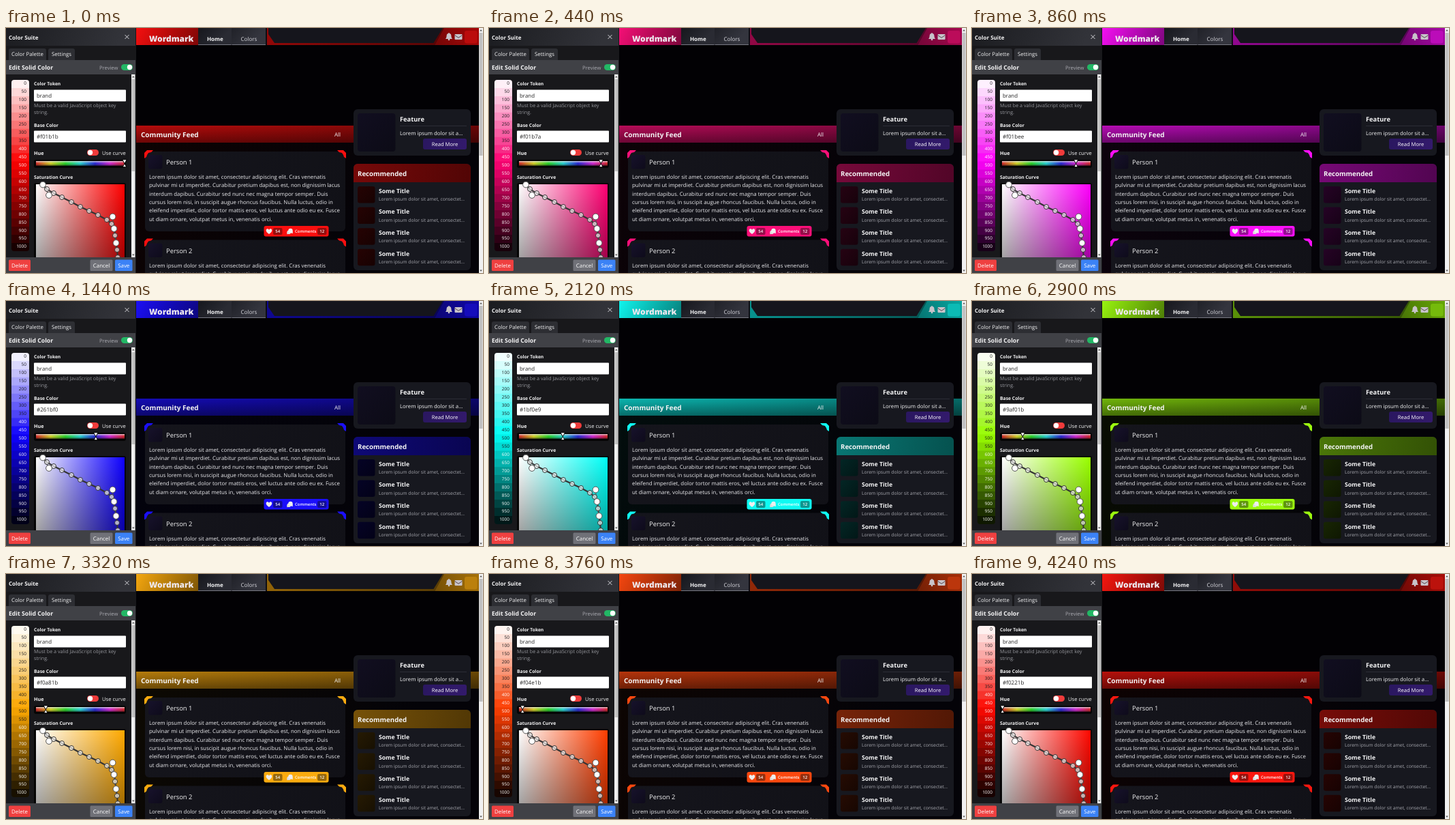
Recreate the animation shown at these times as an HTML page with a canvas. Size 700 by 359 pixels, loop 4260 ms.

```html
<!DOCTYPE html>
<html lang="en">
<head>
<meta charset="utf-8">
<title>Color Suite</title>
<style>
html, body { margin: 0; width: 100%; height: 100%; overflow: hidden; background: #050308; }
canvas { display: block; width: 700px; height: 359px; }
</style>
</head>
<body>
<canvas id="stage" width="700" height="359"></canvas>
<script>
const g = document.getElementById('stage').getContext('2d');
g.textRendering = 'geometricPrecision';
const LOOP = 4260, STEP = 20;
const FONT = '"Open Sans", "Noto Sans", sans-serif';
const LOREM = [
  'Lorem ipsum dolor sit amet, consectetur adipiscing elit. Cras venenatis',
  'pulvinar mi ut imperdiet. Curabitur pretium dapibus est, non dignissim lacus',
  'interdum dapibus. Curabitur sed nunc nec magna tempor semper. Duis',
  'cursus lorem nisi, in suscipit augue rhoncus faucibus. Nulla luctus, odio in',
  'eleifend imperdiet, dolor tortor mattis eros, vel luctus ante odio eu ex. Fusce',
  'ut diam ornare, volutpat metus in, venenatis orci.'
];

// Hue drag: [ms, degrees, degrees per ms]
const DRAG = [
  [0, 360, -.05], [860, 300.6, -.083], [1440, 243.1, -.097], [2120, 178.03, -.105],
  [2500, 134.37, -.116], [3320, 39.72, -.075], [4240, 1.97, -.012], [4260, 1.8, 0]
];

function hueAt(t) {
  let i = 0;
  while (i < DRAG.length - 2 && t > DRAG[i + 1][0]) i++;
  const [t0, a, m0] = DRAG[i], [t1, b, m1] = DRAG[i + 1];
  const d = t1 - t0, u = (t - t0) / d, v = 1 - u;
  return v * v * (1 + 2 * u) * a + u * v * v * d * m0 +
         u * u * (3 - 2 * u) * b - u * u * v * d * m1;
}

const hsl = (h, s, l, a = 1) => `hsla(${h},${s}%,${l}%,${a})`;

function channels(h) {
  return [0, 240, 120].map(o => {
    const d = Math.abs(((h + o) % 360) / 60 - 3) - 1;
    return Math.round(27 + 213 * Math.min(1, Math.max(0, d)));
  });
}

const hex = rgb => '#' + rgb.map(c => c.toString(16).padStart(2, '0')).join('');

function ramp(x0, y0, x1, y1, ...stops) {
  const r = g.createLinearGradient(x0, y0, x1, y1);
  stops.forEach((c, i) => r.addColorStop(i / (stops.length - 1), c));
  return r;
}

function box(x, y, w, h, fill, r = 0) {
  g.fillStyle = fill;
  g.beginPath();
  g.roundRect(x, y, w, h, r);
  g.fill();
}

function poly(fill, ...p) {
  g.fillStyle = fill;
  g.beginPath();
  for (let i = 0; i < p.length; i += 2) g.lineTo(p[i], p[i + 1]);
  g.closePath();
  g.fill();
}

function line(color, width, ...p) {
  g.strokeStyle = color;
  g.lineWidth = width;
  g.beginPath();
  for (let i = 0; i < p.length; i += 2) g.lineTo(p[i], p[i + 1]);
  g.stroke();
}

function dot(x, y, r, fill, edge) {
  g.beginPath();
  g.arc(x, y, r, 0, 7);
  g.fillStyle = fill;
  g.fill();
  if (edge) {
    g.strokeStyle = edge;
    g.lineWidth = 1;
    g.stroke();
  }
}

function text(s, x, y, size, color = '#f4f4f5', weight = 400, align = 'left') {
  g.font = `${weight} ${size}px ${FONT}`;
  g.textAlign = align;
  g.fillStyle = color;
  g.fillText(s, x, y);
}

const bold = (s, x, y, size, color) => text(s, x, y, size, color, 700);

function toggle(x, y, color, on) {
  box(x, y, 17, 9, color, 4.5);
  dot(x + (on ? 12.5 : 4.5), y + 4.5, 3.7, '#fff');
}

function scrollbar(x, y, w, h, thumb) {
  box(x, y, w, h, '#f1f1f1');
  box(x + .5, y + 7, w - 1, thumb, '#c1c1c1');
  const c = x + w / 2;
  poly('#505050', c - 1.8, y + 4.5, c + 1.8, y + 4.5, c, y + 2.3);
  poly('#505050', c - 1.8, y + h - 4.5, c + 1.8, y + h - 4.5, c, y + h - 2.3);
}

function swatches(h, rgb) {
  const luma = (rgb[0] * .3 + rgb[1] * .59 + rgb[2] * .11) / 255;
  const flip = luma > .55 ? 12 : 8;
  g.save();
  g.beginPath();
  g.roundRect(8, 76, 26, 251, 4);
  g.clip();
  for (let i = 0; i <= 20; i++) {
    const l = i < 10 ? 97 - i * 5 : 50 - (i - 9.5) * 4.3;
    const y = 76 + i * 251 / 21;
    box(8, y, 26, 12.5, hsl(h, i < 9 ? 92 : 98, l));
    text(i * 50, 30, y + 7.4, 6.5, i < flip ? '#18181b' : '#fff', 400, 'right');
  }
  g.restore();
}

function curve(h) {
  box(41, 227, 135, 109, '#050505', [3, 3, 0, 0]);
  g.save();
  g.beginPath();
  g.rect(41, 225, 136, 111);
  g.clip();
  box(44, 229, 130, 107, ramp(44, 0, 174, 0, '#fff', hsl(h, 100, 50)));
  box(44, 229, 130, 107, ramp(0, 229, 0, 529, 'rgba(0,0,0,0)', '#000'));
  const path = [54, 229, 60, 236, 70, 242, 82, 248, 96, 255, 109, 262, 122, 268,
    135, 274, 148, 281, 155, 287, 159, 294, 160, 304, 163, 325, 164, 336];
  line('#333', 2, ...path);
  line('#555', 1, 54, 229, 63, 245);
  line('#555', 1, 156, 276, 158.5, 294, 161.5, 315);
  for (let i = 2; i < path.length; i += 2) dot(path[i], path[i + 1], 3.5, 'rgba(255,255,255,.65)', '#333');
  [[54, 229.5], [63, 245], [156.5, 276.5], [158.5, 294], [161.5, 315]]
    .forEach(([x, y]) => dot(x, y, 4.4, '#fff', '#555'));
  g.restore();
}

function hueBar(h) {
  box(41, 193, 135, 12, '#050505', 3);
  const rainbow = Array.from({length: 13}, (_, i) => hsl(i * 30, 85, 48));
  box(44, 195, 130, 7, ramp(44, 0, 174, 0, ...rainbow));
  box(44, 195, 130, 7, ramp(0, 195, 0, 202,
    'rgba(255,255,255,.8)', 'rgba(128,128,128,.15)', 'rgba(0,0,0,.7)'));
  const x = 44 + h / 360 * 130;
  poly('#000', x - 4, 192.5, x + 4, 192.5, x, 199.5);
  poly('#fff', x - 2.5, 193.3, x + 2.5, 193.3, x, 197.8);
  poly('#000', x - 3.3, 204, x + 3.3, 204, x, 198.3);
  poly('#fff', x - 2, 203.2, x + 2, 203.2, x, 199.5);
}

function panel(h, rgb) {
  box(0, 0, 191, 359, '#18181b');
  box(0, 0, 190, 26, ramp(0, 0, 150, 60, '#1b1c20', '#323339'));
  bold('Color Suite', 4, 16.5, 8);
  line('#d4d4d8', 1, 174.5, 10, 180.5, 16);
  line('#d4d4d8', 1, 180.5, 10, 174.5, 16);
  box(4, 30, 55, 17, '#2d2e33', [3, 3, 0, 0]);
  box(62, 30, 39, 17, '#2d2e33', [3, 3, 0, 0]);
  text('Color Palette', 8, 41, 7.8);
  text('Settings', 67, 41, 7.8);
  box(0, 47, 190, 21, '#404146');
  bold('Edit Solid Color', 4, 61, 8.7);
  text('Preview', 137, 60.5, 7.6, '#a9aab0');
  toggle(169, 53, '#22b765', true);

  swatches(h, rgb);

  bold('Color Token', 41, 84, 6.7);
  box(41, 90.5, 135, 17, '#fff', 1);
  text('brand', 45, 102, 7.9, '#222');
  text('Must be a valid JavaScript object key', 41, 116, 7.2, '#96979d');
  text('string.', 41, 126, 7.2, '#96979d');
  bold('Base Color', 41, 144.5, 6.8);
  box(41, 150.5, 135, 17, '#fff', 1);
  text(hex(rgb), 45, 161.5, 8.1, '#222');
  bold('Hue', 41, 185.5, 7.2);
  toggle(119, 178, '#ef3b3b', false);
  text('Use curve', 141, 185.5, 7.6);
  hueBar(h);
  bold('Saturation Curve', 41, 221, 6.75);
  curve(h);
  scrollbar(184, 68, 5.5, 268, 135);

  box(0, 336, 190, 23, '#404146');
  const button = (s, x, w, color) => {
    box(x, 339.5, w, 16.5, color, 1.5);
    text(s, x + w / 2, 351, 7.9, '#fff', 400, 'center');
  };
  button('Delete', 4, 32, '#ef4040');
  button('Cancel', 123.5, 33, '#707178');
  button('Save', 160, 25.5, '#3b82f6');
}

function heart(x, y) {
  g.fillStyle = '#eee';
  g.beginPath();
  g.moveTo(x, y + 4);
  g.bezierCurveTo(x - 8, y - 1, x - 3, y - 6.5, x, y - 2.2);
  g.bezierCurveTo(x + 3, y - 6.5, x + 8, y - 1, x, y + 4);
  g.fill();
}

function chat(x, y) {
  dot(x - 1.3, y + 1.2, 2.8, '#ddd');
  poly('#ddd', x - 4, y + 1, x - 4.2, y + 4.2, x, y + 3.5);
  dot(x + 1, y - 1, 3.2, '#eee');
  poly('#eee', x + 4, y - 1, x + 4.4, y + 3, x, y + 2);
}

function bell(x, y) {
  g.fillStyle = '#c8c4ca';
  g.beginPath();
  g.moveTo(x - 5, y + 3);
  g.quadraticCurveTo(x - 3.4, y + 1.5, x - 3.4, y - 1.5);
  g.arc(x, y - 1.5, 3.4, Math.PI, 0);
  g.quadraticCurveTo(x + 3.4, y + 1.5, x + 5, y + 3);
  g.fill();
  dot(x, y - 5, .9, '#c8c4ca');
  dot(x, y + 4, 1.3, '#c8c4ca');
}

function mail(x, y) {
  box(x - 5.5, y - 4, 11, 8, '#c8c4ca', 1);
  line('#55454c', 1, x - 5.5, y - 2.5, x, y + 1.3, x + 5.5, y - 2.5);
}

function navbar(h) {
  box(191, 0, 503, 25, '#0e0e14');
  box(191, 0, 91, 25, ramp(195, 0, 270, 40, hsl(h, 88, 50), hsl(h, 90, 38), hsl(h, 90, 27)));
  text('Wordmark', 210, 20, 11.9, '#eee8ee', 800);
  box(282, 0, 49, 25, ramp(282, 0, 310, 25, '#16171d', '#2a2b33'));
  box(331, 0, 50, 25, ramp(331, 0, 360, 25, '#202128', '#34353e'));
  box(282, 24, 48.5, 1, '#777882');
  box(331.5, 24, 49.5, 1, '#777882');
  bold('Home', 295, 19, 8);
  text('Colors', 344.5, 19, 8, '#d8d8dd');
  poly(ramp(381, 0, 640, 0, hsl(h, 90, 30), hsl(h, 90, 18)), 383, 0, 643, 0, 629, 25, 383, 25);
  poly('#15151c', 385, 0, 641, 0, 627.5, 22, 394, 22, 385, 9);
  poly(ramp(630, 25, 694, 0, hsl(h, 90, 24), hsl(h, 92, 34)), 643, 0, 694, 0, 694, 25, 629, 25);
  bell(650, 13);
  mail(664, 13);
  box(673, 4, 18.5, 18.5, hsl(h, 88, 39), 3);
}

function corners(y, brand) {
  poly(brand, 203, y + 12, 203, y + 4, 207, y, 216, y, 213, y + 3, 209, y + 4, 207, y + 7, 206, y + 10);
  poly(brand, 499, y + 12, 499, y + 4, 495, y, 486, y, 489, y + 3, 493, y + 4, 495, y + 7, 496, y + 10);
}

function post(n, y, h, brand) {
  box(204, y + 2, 294, 117, ramp(204, y, 498, y + 117, '#15151c', '#111117'), 6);
  corners(y, brand);
  box(209, y + 7, 20.5, 20.5, ramp(209, y + 7, 229, y + 27, '#17122b', '#0e0b1b'), 3);
  text('Person ' + n, 235, y + 21, 9.4);
  LOREM.forEach((s, i) => text(s, 210, y + 42 + i * 12.35, 7.9, '#ececef'));
  box(378.5, y + 111, 95, 15.5, brand, 3);
  box(392, y + 114, 13.5, 10, hsl(h, 80, 25, .75), 2);
  box(457, y + 114, 13.5, 10, hsl(h, 80, 25, .75), 2);
  heart(386, y + 119);
  chat(416.5, y + 119);
  text('54', 398.7, y + 121.2, 6, '#fff', 600, 'center');
  text('Comments', 424, y + 121.2, 6, '#fff', 600);
  text('12', 463.7, y + 121.2, 6, '#fff', 600, 'center');
}

function sidebar(h) {
  box(510, 119, 172, 68, '#17181f', 6);
  box(516, 125, 55.5, 56, ramp(516, 125, 571, 181, '#110e20', '#0c0b16'), 4);
  bold('Feature', 578, 136.5, 9.3);
  box(578, 143, 98, 1, '#2b2c36');
  text('Lorem ipsum dolor sit a...', 578, 156.5, 7.8);
  box(612, 162, 64, 16, ramp(612, 162, 676, 178, '#2a1760', '#331a6c'), 3);
  text('Read More', 644, 173, 7.6, '#fff', 400, 'center');

  box(510, 199, 172, 156, '#17181f', 6);
  box(510, 199, 172, 27, ramp(510, 199, 682, 226, hsl(h, 86, 25), hsl(h, 88, 17)), [6, 6, 0, 0]);
  bold('Recommended', 516, 216.5, 9.7);
  for (let i = 0; i < 4; i++) {
    const y = 232 + i * 30.6;
    box(516, y, 25.5, 24.5, ramp(516, y, 541, y + 24, hsl(h, 85, 8), hsl(h, 85, 5)), 3);
    bold('Some Title', 547, y + 9.8, 8.65);
    text('Lorem ipsum dolor sit amet, consectet...', 547, y + 21, 6.75, '#a6a7ae');
  }
}

function draw(t) {
  const h = hueAt(t), rgb = channels(h);
  const brand = hsl(h, 96, 52);
  box(191, 0, 509, 359, '#020104');
  box(191, 168, 503, 191, ramp(191, 168, 500, 359, hsl(h, 70, 3), '#040308'));
  navbar(h);
  box(191, 143, 503, 25, ramp(191, 143, 694, 168, hsl(h, 88, 38), hsl(h, 88, 31), hsl(h, 90, 22)));
  box(191, 143, 503, 25, ramp(0, 143, 0, 168, 'rgba(0,0,0,0)', 'rgba(0,0,0,.4)'));
  bold('Community Feed', 198, 159.5, 10);
  text('All', 482, 159, 8);
  post(1, 179, h, brand);
  post(2, 308.5, h, brand);
  sidebar(h);
  scrollbar(694, 0, 6, 359, 180);
  panel(h, rgb);
}

const start = performance.now();
function tick(now) {
  const t = Math.max(0, now - start) % LOOP;
  draw(Math.floor(t / STEP) * STEP);
  requestAnimationFrame(tick);
}
draw(0);
requestAnimationFrame(tick);
</script>
</body>
</html>
```
